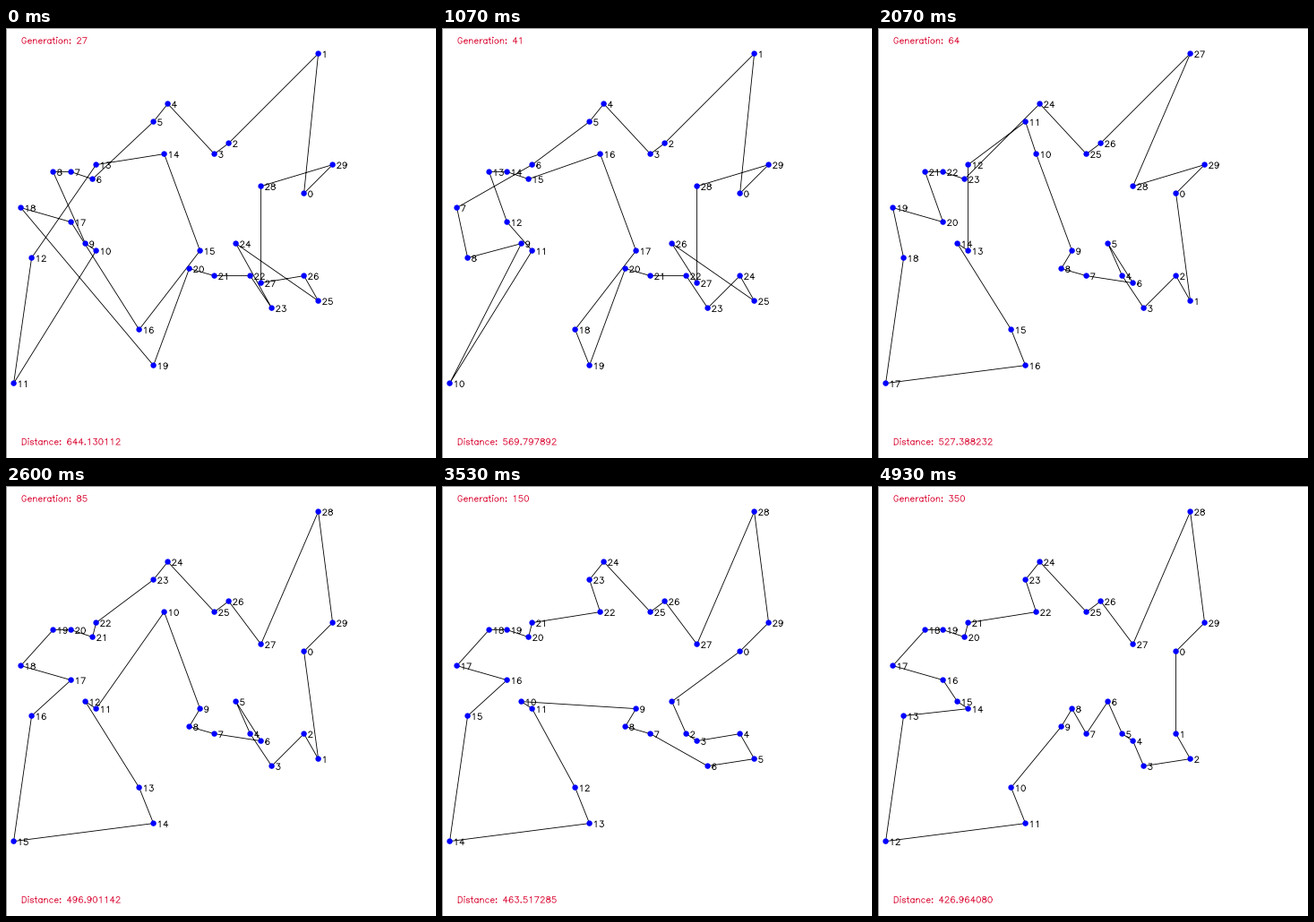
A matplotlib script for the animation above (4.99 s loop, 480 by 480 pixels).

```python
import math

import matplotlib.pyplot as plt
import numpy as np
from matplotlib.animation import FuncAnimation

plt.rcParams["path.simplify"] = False

SIZE, DPI = 480, 80
PX = 72 / DPI          # one pixel in points
LOOP, TICK = 4990, 10  # ms
TEXT_SCALE = 0.32

# cities in the order of the shortest tour
CITIES = np.array([
    (83, 46), (83, 69), (87, 76), (74, 78), (71, 71), (68, 69),
    (64, 60), (58, 69), (54, 62), (51, 67), (37, 84), (41, 94),
    (2, 99), (7, 64), (25, 62), (22, 60), (18, 54), (4, 50),
    (13, 40), (18, 40), (24, 42), (25, 38), (44, 35), (41, 26),
    (45, 21), (58, 35), (62, 32), (71, 44), (87, 7), (91, 38),
])
SPOTS = CITIES * 4 + 0.1

START = [0, 28, *range(26, 22, -1), 20, 19, 18, 15, 14, 12, 13, 21, 22,
         8, 10, 16, 17, 11, 9, 7, 5, 3, 6, 2, 1, 4, 27, 29]

# (last step, generation by then, moves on the way)
# a move takes the run first..last, reverses it and puts it after a city
PHASES = [
    (9, 32, [(6, 1, 3), (14, 13, 15), (16, 17, 13)]),
    (24, 51, [(20, 21, 23), (14, 12, 15), (16, 16, 14), (10, 11, 15), (11, 10, 15)]),
    (31, 64, [(28, 27, 0), (4, 6, 5), (20, 23, 22), (17, 13, 12), (14, 14, 21),
              (27, 27, 28)]),
    (48, 116, [(23, 21, 20), (28, 27, 26), (17, 16, 13), (5, 6, 0), (4, 4, 5),
               (2, 1, 4)]),
    (53, 150, [(14, 15, 22), (22, 22, 21)]),
    (56, 172, [(9, 8, 7)]),
    (62, 227, [(6, 4, 3)]),
    (64, 245, [(15, 14, 9)]),
    (69, 290, [(14, 15, 13)]),
    (74, 350, [(15, 14, 13)]),
]
RESTS = {3, 10, 15, 22, 25, 36, 39, 42, 43}
QUIET = 53  # from here only the last step of a phase shows


# ---- single-stroke lettering, 21 units tall ----

def arc(x, y, rx, ry, start=0, end=360):
    a = np.radians(np.linspace(start, end, 18))
    return list(zip(x + rx * np.cos(a), y + ry * np.sin(a)))


def dot(y):
    return arc(4.5, y, 1, 1)


stem = [(4, 14), (4, 0)]
bowl = arc(9.3, 7, 6.3, 7, 40, 322)
belly = arc(10, 6.75, 7, 6.75, 115, -155)
six = arc(11, 10, 7, 11, 48, 180) + arc(10.5, 6.5, 6.5, 6.5, 180, -180)

# character: (advance, strokes)
GLYPHS = {
    "0": (20, [arc(10, 10.5, 7, 10.5)]),
    "1": (20, [[(6, 17), (8, 18), (11, 21), (11, 0)]]),
    "2": (20, [arc(10, 15.5, 6, 5.5, 175, -30) + [(3, 0), (17, 0)]]),
    "3": (20, [[(5, 21), (16, 21), (10, 13)] + belly[4:]]),
    "4": (20, [[(13, 0), (13, 21), (3, 7), (18, 7)]]),
    "5": (20, [[(15, 21), (5, 21), (4, 12)] + belly]),
    "6": (20, [six]),
    "7": (20, [[(3, 21), (17, 21), (7, 0)]]),
    "8": (20, [arc(10, 16.75, 6, 4.25), arc(10, 6.25, 7, 6.25)]),
    "9": (20, [[(20 - x, 21 - y) for x, y in six]]),
    "G": (21, [arc(10.5, 10.5, 7.5, 10.5, 33, 346) + [(13, 8)]]),
    "D": (21, [[(4, 0), (4, 21)] + arc(10.5, 10.5, 7.5, 10.5, 90, -90) + [(4, 0)]]),
    "a": (19, [[(15, 14), (15, 0)], bowl]),
    "c": (18, [bowl]),
    "e": (18, [[(3, 8)] + arc(9.3, 7, 6.3, 7, 8, 322)]),
    "i": (8, [dot(21), stem]),
    "n": (19, [stem, [(4, 10)] + arc(10, 9, 5, 5, 130, 0) + [(15, 0)]]),
    "o": (19, [arc(9.5, 7, 6.5, 7)]),
    "r": (13, [stem, arc(12, 7, 8, 7, 175, 90)]),
    "s": (17, [arc(8.5, 10.5, 5.5, 3.5, 10, 270) + arc(8.5, 3.5, 5.5, 3.5, 90, -170)]),
    "t": (12, [[(5, 21), (5, 4), (6, 1), (8, 0), (10, 0)], [(2, 14), (9, 14)]]),
    ":": (10, [dot(13), dot(1)]),
    ".": (10, [dot(1)]),
    " ": (16, []),
}


def write(text, x, y):
    """Stroke points of a text line, strokes parted by nan."""
    points = []
    for char in text:
        advance, strokes = GLYPHS[char]
        for stroke in strokes:
            points += [(x + u * TEXT_SCALE, y - v * TEXT_SCALE) for u, v in stroke]
            points.append((math.nan, math.nan))
        x += advance * TEXT_SCALE
    return points


# ---- tours ----

def length(tour):
    legs = CITIES[tour] - CITIES[np.roll(tour, -1)]
    return np.hypot(*legs.T).sum()


def move(tour, first, last, after):
    i, j = tour.index(first), tour.index(last) + 1
    rest = tour[:i] + tour[j:]
    at = rest.index(after) + 1
    return rest[:at] + tour[i:j][::-1] + rest[at:]


def scene(generation, tour):
    title = write(f"Generation: {generation:.0f}", 16.4, 16.8)
    title += write(f"Distance: {length(tour):.6f}", 16.4, 464.6)
    labels = []
    for i, (x, y) in enumerate(SPOTS[tour]):
        labels += write(str(i), x + 4, y + 4)
    return [np.array(p).T for p in (SPOTS[tour + tour[:1]], labels, title)]


def history():
    """Every change of the picture as (step, scene)."""
    step, generation, tour = 0, 27, START
    yield step, scene(generation, tour)
    for last, target, moves in PHASES:
        path = [tour]
        for m in moves:
            path.append(move(path[-1], *m))
        shown = [s for s in range(step + 1, last + 1) if s not in RESTS]
        if last > QUIET:
            shown = [last]
        for n, s in enumerate(shown, 1):
            tour = path[math.ceil(n * len(moves) / len(shown))]
            count = np.interp(s, [step, last], [generation, target])
            yield s, scene(count, tour)
        step, generation = last, target


steps, scenes = zip(*history())
ticks = [round(step * 20 / 3) for step in steps]  # 15 steps a second


# ---- drawing ----

fig = plt.figure(figsize=(SIZE / DPI, SIZE / DPI), dpi=DPI, facecolor="white")
ax = fig.add_axes([0, 0, 1, 1])
ax.axis("off")
ax.set_xlim(-0.5, SIZE - 0.5)
ax.set_ylim(SIZE - 0.5, -0.5)


def stroke(color, zorder):
    return ax.plot([], [], color=color, lw=0.85 * PX, zorder=zorder)[0]


ax.plot([SIZE, 0, 0], [0, 0, SIZE], color="0.6", lw=PX, snap=False)
for spot in SPOTS:
    ax.add_patch(plt.Circle(spot, 3.2, color="blue", lw=0, zorder=3))
lines = stroke("black", 2), stroke("black", 4), stroke("crimson", 4)


def update(tick):
    current = scenes[np.searchsorted(ticks, tick, side="right") - 1]
    for line, points in zip(lines, current):
        line.set_data(*points)
    return lines


anim = FuncAnimation(fig, update, frames=LOOP // TICK, interval=TICK,
                     repeat=True, repeat_delay=0)
plt.show()
```
